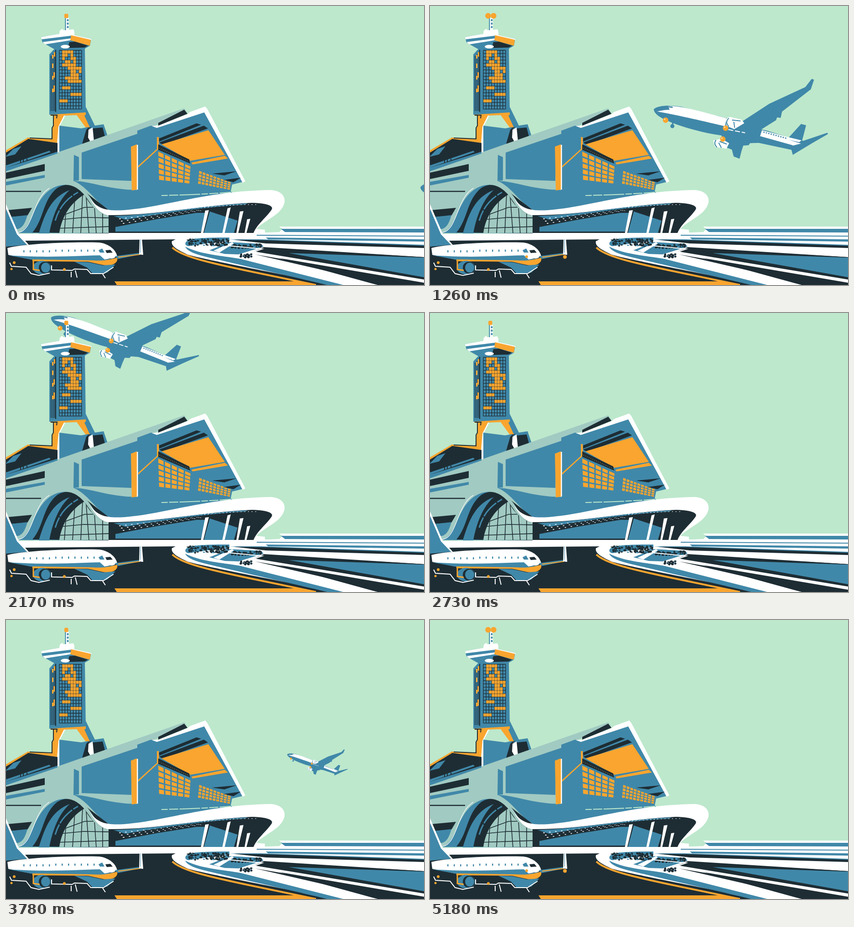
These frames come from a looping animation (917x611 px, 5320 ms). An HTML page with a canvas:

```html
<!DOCTYPE html>
<html lang="en">
<head>
<meta charset="utf-8">
<title>Airport</title>
<style>
html, body { margin: 0; width: 100%; height: 100%; overflow: hidden; background: #bde8cc; }
canvas { display: block; }
</style>
</head>
<body>
<canvas id="stage" width="917" height="611"></canvas>
<script>
const W = 917, H = 611, LOOP = 5320, STEP = 70;
const SKY = '#bde8cc', BLUE = '#4088a9', DARK = '#1e2d34', ORANGE = '#f9a52f', WHITE = '#fff', GREY = '#a1cac2';

const view = document.getElementById('stage').getContext('2d');
const sceneCanvas = document.createElement('canvas');
sceneCanvas.width = W;
sceneCanvas.height = H;
let ctx = sceneCanvas.getContext('2d');

function fill(color, d) {
  ctx.fillStyle = color;
  ctx.fill(new Path2D(d));
}
function line(color, width, d, dash = []) {
  ctx.strokeStyle = color;
  ctx.lineWidth = width;
  ctx.setLineDash(dash);
  ctx.stroke(new Path2D(d));
}
function dot(color, x, y, rx, ry = rx) {
  ctx.fillStyle = color;
  ctx.beginPath();
  ctx.ellipse(x, y, rx, ry, 0, 0, 7);
  ctx.fill();
}
function box(color, x, y, w, h) {
  ctx.fillStyle = color;
  ctx.fillRect(x, y, w, h);
}
let seed = 7;
const rand = () => (seed = seed * 16807 % 2147483647) / 2147483647;

// Panes inside a four-cornered area: corners run clockwise from top left.
function panes(color, [a, b, c, d], cols, rows, gapX, gapY) {
  const at = (u, v) => [0, 1].map(i =>
    (a[i] * (1 - u) + b[i] * u) * (1 - v) + (d[i] * (1 - u) + c[i] * u) * v).join(' ');
  for (let r = 0; r < rows; r++) for (let k = 0; k < cols; k++) {
    const u = k / cols, v = r / rows, p = u + (1 - gapX) / cols, q = v + (1 - gapY) / rows;
    fill(color, `M${at(u, v)}L${at(p, v)}L${at(p, q)}L${at(u, q)}Z`);
  }
}

function tower() {
  // legs
  fill(BLUE, 'M174 219L195 262L182 268L164 238Z');
  fill(WHITE, 'M124 238L131 238L118 263L117 322L112 322L113 262Z');
  fill(ORANGE, 'M97 235L175 232L175 238L172 240L184 266L177 269L155 239L127 240L115 264L112 300L48 293L0 322V316L48 288L99 292L103 262L104 241L97 240Z');
  line(DARK, 2, 'M98 239H112L111 246M104 240V262L101 267V291L52 289');
  // shaft
  fill(BLUE, 'M95 106L107 93L173 91L175 233L95 238Z');
  line(DARK, 1.5, 'M99 109V230M103 105V230M106.500 100V230');
  line(DARK, 2, 'M109 96V232');
  [[101, 107, 8], [105, 101, 10], [101, 126, 10], [104, 145, 12], [101, 153, 8], [104, 174, 14], [101, 181, 8]]
    .forEach(([x, y, h]) => box(ORANGE, x, y, 3, h));
  const cw = 6.1, ch = 7.15;
  for (let i = 0; i <= 8; i++) line(DARK, 1.3, `M${117 + i * cw} 97V226`);
  for (let i = 0; i <= 18; i++) line(DARK, 1.3, `M117 ${97 + i * ch}H166`);
  const lit = ['1234', '124', '145', '235', '12345', '34567', '457', '456', '23456', '34567', '', '123', '', '4567', '', '012'];
  lit.forEach((cols, r) => [...cols].forEach(c =>
    box(ORANGE, 117.2 + c * cw, 97.3 + r * ch, cw - .4, ch - .6)));
  // deck
  fill(BLUE, 'M77 68L118 61L143 63L187 72L184 87L172 94L105 94L80 80Z');
  fill(DARK, 'M139 79L152 78L180 87L172 91L136 92Z');
  fill(WHITE, 'M77 68L117 61L118 54L123 50L126 53L148 51L150 57V64L187 72V75L143 65L78 73Z');
  fill(WHITE, 'M80 79L142 71V75L86 84Z');
  fill(ORANGE, 'M143 64L186 74L184 87L141 75Z');
  dot(WHITE, 130, 89, 10, 4);
  box(WHITE, 131, 26, 7, 27);
  line(BLUE, 2, 'M130.500 26V53');
  [31, 38.500, 46].forEach(y => dot(BLUE, 135.500, y, 2, 2.5));
}

function leftRoof() {
  fill(DARK, 'M0 321L49 291L113 300V322L0 358Z');
  fill(BLUE, 'M0 329L16 313L34 307L20 325L0 330Z');
  fill(BLUE, 'M0 349L95 317L98 320L0 354Z');
  line(DARK, 2, 'M32 336V345M38 335V343M46 334V341');
  fill(BLUE, 'M117 262L165 268L181 265L190 305L117 320Z');
  fill(DARK, 'M181 266L214 260L225 292L165 309L176 271Z');
  fill(BLUE, 'M194 262L214 259L225 291L219 293L212 266L180 269Z');
  fill(WHITE, 'M181 271L190 266L193 296L185 297L180 288Z');
}

function hall() {
  fill(GREY, 'M0 360L391 224L398 235L288 276V410L200 445L60 498H0Z');
  fill(BLUE, 'M0 354L113 319V323L0 362Z');
  fill(DARK, 'M0 365L85 346V361L0 379Z');
  fill(BLUE, 'M0 385L85 370V376L0 393Z');
  line(DARK, 2.5, 'M0 406H77');
  fill(DARK, 'M3 447L57 442L47 459L11 462Z');
  fill(BLUE, 'M10 462L47 458C42 475 36 488 25 490L15 480Z');
  fill(BLUE, 'M149 326L160 331V382L148 383Z');
  fill(BLUE, 'M166 321L288 280V306L275 311V383L166 379Z');
  // front face
  fill(BLUE, 'M288 273L318 262L332 266L434 231L521 385L496 391L493 406L500 412L260 455C205 455 190 400 148 383C190 384 220 402 288 403Z');
  fill(WHITE, 'M320 263L334 262L398 237L404 232L437 220L442 226L525 384L519 387L435 233L331 267Z');
  fill(DARK, 'M334 256L391 227L398 236L334 262Z');
  fill(DARK, 'M336 290L418 257L428 260L336 297Z');
  fill(DARK, 'M336 299L434 262L443 268L344 304Z');
  fill(ORANGE, 'M341 303L444 272L480 326L404 339Z');
  fill(ORANGE, 'M407 343L480 328L487 334L409 347Z');
  fill(ORANGE, 'M331 287H335L336 312L290 354V350L331 313Z');
  fill(DARK, 'M334 303L402 336L404 345L334 315Z');
  line(ORANGE, 1, 'M336 311L402 341', [1.5, 3]);
  panes(ORANGE, [[334, 319], [408, 353], [405, 391], [336, 384]], 5, 5, .22, .26);
  panes(ORANGE, [[424, 361], [495, 387], [493, 404], [421, 391]], 9, 4, .26, .28);
  fill(DARK, 'M452 367L506 362L479 371Z');
  fill(DARK, 'M478 381L515 376L499 386Z');
  line(SKY, 2, 'M341 415C390 414 440 412 493 408', [14, 3, 20, 3, 45, 3]);
  fill(ORANGE, 'M274 308L287 303V402L276 404Z');
  box(WHITE, 287, 304, 2.5, 98);
}

function arch() {
  fill(BLUE, 'M28 497C62 480 58 420 105 392C140 380 165 400 180 425C195 447 215 458 240 458V498Z');
  fill(DARK, 'M58 496C84 466 80 424 113 398C134 386 154 391 172 406L240 458V498Z');
  fill(BLUE, 'M72 498C86 452 100 418 140 403C116 424 102 460 95 498Z');
  line(BLUE, 3, 'M108 470C116 442 132 422 158 408', [24, 3, 40, 3]);
  const glass = 'M117 497C122 462 142 430 172 413C184 438 204 454 225 459V497Z';
  fill(GREY, glass);
  ctx.save();
  ctx.clip(new Path2D(glass));
  line(DARK, 1.6, 'M128 498L132 440M146 498L151 420M164 498L168 412M176 420L182 498M194 440L198 498M212 450V498M120 460L172 441L230 440M118 468L170 463L230 464M110 487L230 483');
  ctx.restore();
  line(GREY, 7, 'M20 492C58 496 52 408 115 390C148 381 170 402 186 427C196 444 212 455 238 457');
  line(WHITE, 1.2, 'M26 496C60 494 58 420 95 399');
}

function canopy() {
  fill(WHITE, 'M183 419C201 447 225 449 260 447C350 440 440 405 580 403C605 404 613 418 611 430C605 457 572 466 549 488L568 490V498H225V459C208 455 196 443 183 419Z');
  fill(DARK, 'M225 458C330 459 430 436 540 431C580 432 588 440 582 447C570 464 550 479 543 497H225Z');
  fill(BLUE, 'M236 460C330 457 430 437 530 432L525 435C450 439 360 452 262 468Z');
  fill(BLUE, 'M240 484L330 467L418 453L438 453L428 494H240Z');
  fill(BLUE, 'M447 450L508 470L500 497H434Z');
  for (let r = 0; r < 3; r++) for (let i = 0; i < 14; i++) {
    const u = i / 14;
    dot(WHITE, 250 + i * 13 + r * 4, 466 + r * 5 - u * (20 + r * 5), 2 - u, 1 - u * .3);
  }
  line(DARK, 2, 'M300 462C390 449 450 438 548 434', [2, 5]);
  line(WHITE, 1.2, 'M435 441C480 437 520 434 550 435', [2, 6]);
  fill(WHITE, 'M437 448L445 447L432 500H427Z');
  fill(WHITE, 'M486 443L493 441L479 500H474Z');
  fill(WHITE, 'M513 450L521 449L509 499H505Z');
  fill(WHITE, 'M529 467L536 466L527 499H523Z');
}

function bush(x, y, w, h, n) {
  for (let i = 0; i < n; i++) {
    const u = rand();
    dot(i % 6 ? DARK : BLUE, x + u * w, y + (rand() - .5) * h, 1 + rand() * 2, 1 + rand() * 1.5);
  }
}

function ground() {
  box(DARK, 0, 510, W, 101);
  fill(WHITE, 'M22 499L575 496L600 495L606 488L599 483H917V550L566 528L545 537L817 611H728C620 591 440 556 400 545C378 535 361 526 364 515L372 511L40 514Z');
  fill(BLUE, 'M603 488H917V496L612 495Z');
  fill(BLUE, 'M550 501L917 503V505L550 503Z');
  fill(BLUE, 'M570 507L917 511V516L575 511Z');
  fill(BLUE, 'M490 511L560 511L917 523V526L560 516Z');
  fill(DARK, 'M500 512L575 513L917 525V530L570 520Z');
  // lane wedges
  fill(DARK, 'M566 530L917 550V611H815L545 537Z');
  fill(BLUE, 'M620 541L917 551V594Z');
  fill(WHITE, 'M547 538L917 599V606L546 543Z');
  fill(DARK, 'M546 544L917 607V611H838Z');
  fill(WHITE, 'M510 551L545 547L815 611H740Z');
  // planted loop
  fill(BLUE, 'M394 523C388 508 430 507 490 507L490 513L400 526Z');
  fill(BLUE, 'M446 535L492 517L560 521L565 527L510 544L480 543Z');
  fill(WHITE, 'M455 536L496 517L500 520L468 540Z');
  fill(BLUE, 'M393 527C430 545 470 546 515 554L740 611H705C600 586 490 562 430 547C408 541 397 535 393 527Z');
  bush(398, 518, 90, 15, 150);
  bush(495, 526, 66, 8, 70);
  bush(514, 547, 26, 7, 30);
  line(WHITE, 2, 'M488 525L562 532L545 538');
  // kerb
  line(ORANGE, 4, 'M365 529C385 548 440 561 530 580L680 611');
  fill(ORANGE, 'M238 603H640L680 611H243Z');
}

function parkedPlane() {
  fill(WHITE, 'M0 434L27 497L50 523H0Z');
  fill(BLUE, 'M0 444L24 500L46 523L0 527Z');
  fill(WHITE, 'M3 530C40 520 150 516 205 518C227 521 242 535 244 549L215 556L60 556L5 545Z');
  fill(BLUE, 'M5 546C90 552 150 547 206 546L216 555L243 552C236 560 215 560 190 558L60 556Z');
  dot(WHITE, 231, 547, 10, 6);
  fill(ORANGE, 'M58 555L190 557C215 559 230 555 244 551C247 564 230 571 212 567L180 560L58 559Z');
  for (let x = 38; x < 196; x += 14) box(BLUE, x, 533.5 + (x > 100 ? 0 : 1.5), 2.5, 4.5);
  fill(BLUE, 'M203 535L211 531L216 540H206Z');
  fill(DARK, 'M218 535L229 534L234 540L221 541Z');
  fill(BLUE, 'M238 548L290 541L300 543L246 554Z');
  line(ORANGE, 2, 'M246 550L294 544');
  fill(WHITE, 'M293 508L298 507L301 545L292 544Z');
  line(BLUE, 1, 'M295 511V540');
  fill(BLUE, 'M150 560L180 561L212 568L240 566L222 584L190 586L178 573Z');
  // engine
  dot(BLUE, 79, 573, 20, 15);
  dot(DARK, 85, 573, 13, 13);
  dot(BLUE, 87, 573, 10, 11);
  line(ORANGE, 3, 'M60 559V577L74 579');
  line(WHITE, 2, 'M8 562L12 570L44 572L55 586L72 590L96 585M100 568V578L145 579L150 576L178 577L186 586L214 586L236 572M152 579L156 595M143 582V594M212 587L218 596');
  dot(ORANGE, 18, 562, 3);
  dot(ORANGE, 12, 576, 2.5);
  dot(ORANGE, 128, 577, 3);
}

function buildScene() {
  tower();
  leftRoof();
  hall();
  arch();
  ground();
  canopy();
  parkedPlane();
}

// Drawn around a nose at (491, 226).
function plane(x, y, size, turn) {
  ctx.save();
  ctx.translate(x, y);
  ctx.rotate(turn * Math.PI / 180);
  ctx.scale(size, size);
  ctx.translate(-491, -226);
  fill(BLUE, 'M491 226C498 218 525 216 550 220L650 245L690 261L740 272L795 289L820 294L873 276L874 279L838 300L797 325L794 314L722 299L690 300L640 283C600 278 540 262 510 246C495 238 491 231 491 226Z');
  fill(BLUE, 'M684 253L745 213L824 176L838 158L843 160L836 181L773 230L770 244L762 243L760 249L722 273L724 289L712 286L700 304L688 305L684 318L680 334L667 329L663 314L650 309L640 283Z');
  fill(BLUE, 'M788 287L815 257L826 260L817 295Z');
  fill(WHITE, 'M522 219C550 217 600 232 650 245L648 263C605 253 550 240 498 231C510 228 518 227 526 227Z');
  fill(BLUE, 'M520 219L532 220L533 223L524 222Z');
  fill(WHITE, 'M729 271L786 286L816 293L811 297L788 292L815 300L796 305L724 287Z');
  line(BLUE, 2.5, 'M732 275L784 289', [3, 2.5]);
  fill(BLUE, 'M724 284L797 304L794 310L722 292Z');
  // engines
  fill(WHITE, 'M649 247L658 242L684 248L690 256L668 269L651 262Z');
  line(BLUE, 2, 'M656 245C650 251 650 257 656 263M663 249L682 251M667 253L669 266');
  fill(WHITE, 'M622 294L640 290L657 300L651 312L626 308Z');
  line(BLUE, 2, 'M628 293C624 299 625 303 630 309M634 299L640 310M636 296L652 302');
  line(WHITE, 2, 'M655 270L692 277', [11, 4]);
  // landing gear
  line(BLUE, 3, 'M533 254L532 262');
  dot(BLUE, 532, 263, 4.5);
  [[517, 250], [649, 267], [643, 291]].forEach(([cx, cy]) => {
    dot(ORANGE, cx, cy, 6);
    dot('#fcd69a', cx - 2, cy - 2, 1.8);
  });
  ctx.restore();
}

// Newton form through the knots 0, .63, 1.26, 2.17 s.
const path = (t, a, b, c, d) => a + t * (b + (t - .63) * (c + (t - 1.26) * d));

function lights(t) {
  const phase = t % .665;
  if (phase >= .47) {
    dot(ORANGE, 127.500, 21.5, 6.2);
    dot(ORANGE, 139.500, 21.5, 6.2);
    dot(ORANGE, 212, 549, 3);
    dot(ORANGE, 296, 549.500, 4);
  } else {
    ctx.fillStyle = ORANGE;
    ctx.beginPath();
    ctx.roundRect(128, 17, 8.5, 9.5, 2.5);
    ctx.fill();
  }
}

function draw(t) {
  box(SKY, 0, 0, W, H);
  if (t < 2.8) {
    plane(path(t, 909, -266.7, -103.3, 37.4), path(t, 397, -100, -56.7, 6.4),
      1.178 - .143 * t, -8 + 6.2 * t + .27 * t * t);
  } else if (t > 2.98 && t < 5.15) {
    const u = t - 3.78;
    plane(617 - 410 * u, 294 - 190 * u - 60 * u * u, .353 - .03 * u, 6.2 + 3 * u);
  }
  ctx.drawImage(sceneCanvas, 0, 0);
  lights(t);
}

buildScene();
ctx = view;
const start = performance.now();
let shown = -1;
function tick() {
  const ms = (performance.now() - start) % LOOP;
  const step = Math.min(Math.floor(ms / STEP), 74);
  if (step !== shown) draw((shown = step) * STEP / 1000);
  requestAnimationFrame(tick);
}
tick();
</script>
</body>
</html>
```
